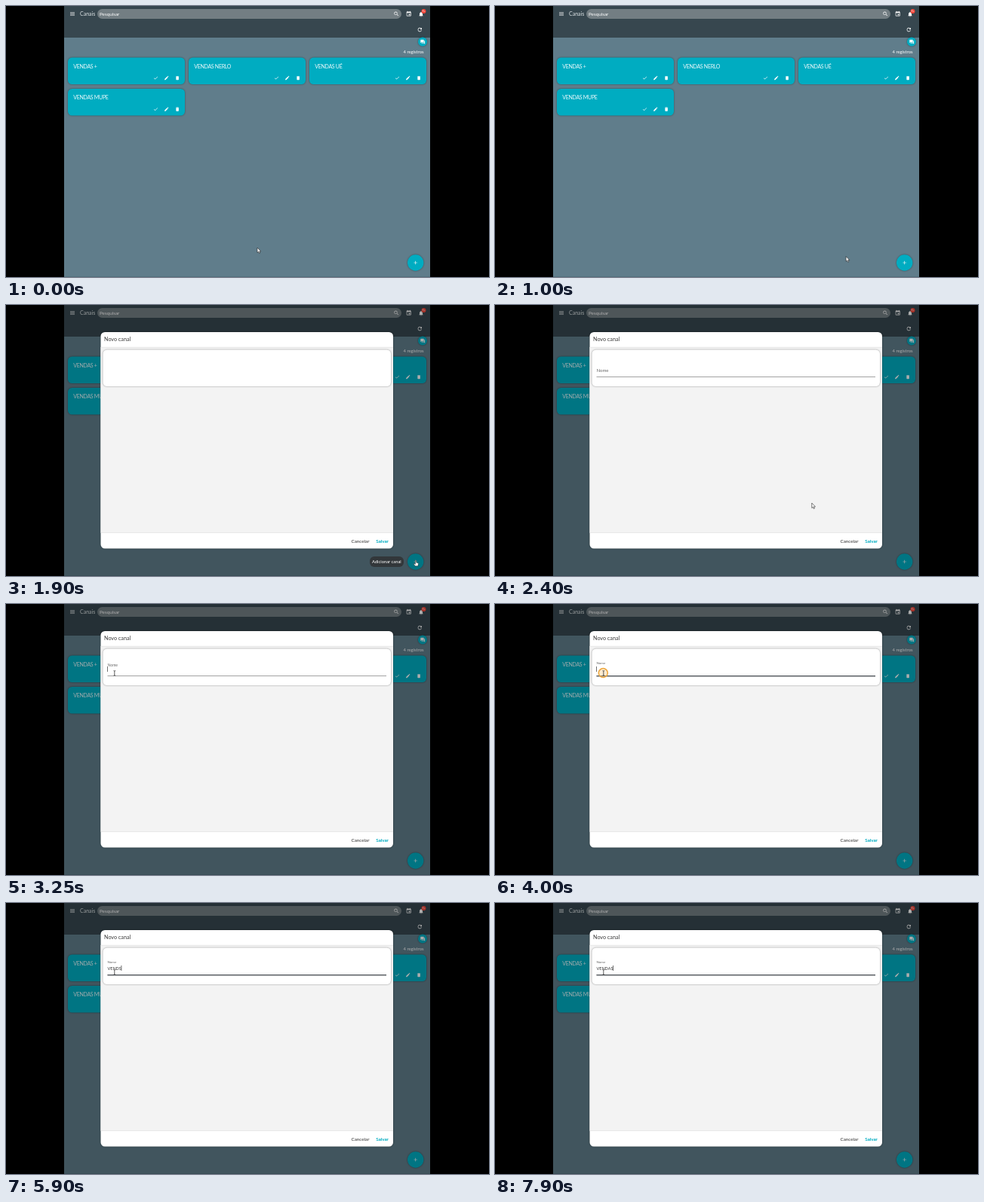
An HTML page for the animation above (8 s loop, 640 by 360 pixels).

```html
<!DOCTYPE html>
<html lang="pt-BR">
<head>
<meta charset="utf-8">
<title>Canais</title>
<style>
  html, body { margin: 0; width: 100%; height: 100%; overflow: hidden; background: #000; }
  svg { display: block; }
  text { font-family: Lato, "Open Sans", sans-serif; white-space: pre; }
  .shadow { filter: drop-shadow(0 .8px .9px rgba(0, 0, 0, .4)); }
</style>
</head>
<body>
<svg id="stage" width="640" height="360" viewBox="0 0 640 360" xmlns="http://www.w3.org/2000/svg">
  <g id="app">
    <rect x="77" width="485" height="360" fill="#607d8b"/>
    <rect x="77" width="485" height="42" fill="#37474f"/>
    <rect x="77" y="359" width="485" height="1" fill="#52707d"/>
    <rect x="121" y="4" width="403" height="13" rx="6.5" fill="#737e83"/>
  </g>
  <rect id="backdrop" x="77" width="485" height="360" opacity=".32"/>
  <g id="dialog">
    <rect class="shadow" x="125.5" y="36" width="387.5" height="287.5" rx="5.5" fill="#fff"/>
    <rect x="125.5" y="56" width="387.5" height="246.5" fill="#f3f3f3"/>
    <path d="M125.5 56.2h387.5M125.5 302.5h387.5" stroke="#dedede" stroke-width=".6"/>
    <rect class="shadow" x="128.5" y="59.5" width="381.5" height="48.5" rx="5.5" fill="#fff"/>
    <g id="field">
      <rect x="134.5" y="95" width="369.5" height=".8" fill="#8c8c8c"/>
      <rect id="focusLine" x="134.5" y="95" width="369.5" height="1.4" fill="#50555a"/>
      <rect id="caret" y="83" width=".7" height="7" fill="#333"/>
    </g>
  </g>
  <g id="tooltip">
    <rect x="482" y="334" width="45" height="14" rx="6" fill="#32373a"/>
  </g>
  <circle id="ring" cx="143.3" cy="91.6" r="6" fill="#f6c778" fill-opacity=".35" stroke="#eda63c" stroke-width="1.5"/>
  <g id="cursor">
    <path id="arrow" d="M0 0v6.6l1.5-1.3 1 2.3 1.2-.5-1-2.2h2z" fill="#fff" stroke="#222" stroke-width=".6"/>
    <path id="hand" d="M-.6 0q.6-.8 1.2 0v2.6l2.4.6q.6.3.4 1.3l-.6 2.8h-3.6l-2-2.8q.2-.9 1-.4l1.2.8z" fill="#fff" stroke="#222" stroke-width=".5"/>
    <path id="beam" d="M-1.3-3.2q1.3 0 1.3.8v5q0 .8-1.3.8M1.3-3.2Q0-3.2 0-2.4M1.3 3.4Q0 3.4 0 2.6" fill="none" stroke="#333" stroke-width=".8"/>
  </g>
</svg>
<script>
const LOOP = 8000;
const SVG = 'http://www.w3.org/2000/svg';
const CYAN = '#00acc1';
const $ = id => document.getElementById(id);

const icons = {
  check: 'M9 16.17L4.83 12l-1.42 1.41L9 19 21 7l-1.41-1.41z',
  edit: 'M3 17.25V21h3.75L17.81 9.94l-3.75-3.75zM20.71 7.04a1 1 0 000-1.41l-2.34-2.34a1 1 0 00-1.41 0l-1.83 1.83 3.75 3.75z',
  trash: 'M6 19a2 2 0 002 2h8a2 2 0 002-2V7H6zM19 4h-3.5l-1-1h-5l-1 1H5v2h14z',
  menu: 'M3 18h18v-2H3zM3 13h18v-2H3zM3 6v2h18V6z',
  search: 'M15.5 14h-.79l-.28-.27A6.47 6.47 0 0016 9.5 6.5 6.5 0 109.5 16c1.61 0 3.09-.59 4.23-1.57l.27.28v.79l5 4.99L20.49 19zm-6 0a4.5 4.5 0 110-9 4.5 4.5 0 010 9z',
  event: 'M17 12h-5v5h5zM16 1v2H8V1H6v2H5a2 2 0 00-2 2v14a2 2 0 002 2h14a2 2 0 002-2V5a2 2 0 00-2-2h-1V1zm3 18H5V8h14z',
  bell: 'M12 22a2 2 0 002-2h-4a2 2 0 002 2zM18 16v-5c0-3.07-1.64-5.64-4.5-6.32V4a1.5 1.5 0 00-3 0v.68C7.63 5.36 6 7.92 6 11v5l-2 2v1h16v-1z',
  refresh: 'M17.65 6.35A8 8 0 1019.73 14h-2.08A6 6 0 1112 6c1.66 0 3.14.69 4.22 1.78L13 11h7V4z',
  chat: 'M21 6h-2v9H6v2a1 1 0 001 1h11l4 4V7a1 1 0 00-1-1zM17 12V3a1 1 0 00-1-1H3a1 1 0 00-1 1v14l4-4h10a1 1 0 001-1z',
  add: 'M19 13h-6v6h-2v-6H5v-2h6V5h2v6h6z'
};

function add(parent, tag, attrs, content = '') {
  const node = document.createElementNS(SVG, tag);
  for (const key in attrs) node.setAttribute(key, attrs[key]);
  node.textContent = content;
  return parent.appendChild(node);
}

function label(parent, content, x, y, size, fill = '#fff', extra = {}) {
  return add(parent, 'text', { x, y, 'font-size': size, fill, ...extra }, content);
}

function icon(name, cx, cy, size = 7) {
  const scale = size / 24;
  add($('app'), 'path', {
    d: icons[name], fill: '#fff', 'fill-rule': 'evenodd',
    transform: `translate(${cx - size / 2} ${cy - size / 2}) scale(${scale})`
  });
}

function card(title, x, y) {
  add($('app'), 'rect', { x, y, width: 155, height: 35.5, rx: 5.5, fill: CYAN, class: 'shadow' });
  label($('app'), title, x + 7.3, y + 14.4, 7, '#eefafc', { 'letter-spacing': -.3 });
  ['check', 'edit', 'trash'].forEach((name, i) => icon(name, x + 116.5 + i * 14.3, y + 27));
}

function buildApp() {
  const app = $('app');
  icon('menu', 88, 10.5, 8);
  label(app, 'Canais', 98, 13, 7, '#dfe5e8');
  label(app, 'Pesquisar', 124, 12.6, 6.3);
  icon('search', 517.3, 10.5, 8);
  icon('event', 533.7, 10.5, 8);
  icon('bell', 550, 11, 8);
  add(app, 'circle', { cx: 553.5, cy: 7, r: 3, fill: '#f44336' });
  label(app, '9+', 553.5, 8.3, 3.6, '#fff', { 'text-anchor': 'middle' });
  icon('refresh', 548.3, 31.5, 8);
  add(app, 'circle', { cx: 552, cy: 47.5, r: 6, fill: CYAN, class: 'shadow' });
  icon('chat', 552.2, 47.7);
  label(app, '4 registros', 553.6, 63.2, 5.9, '#fff', { 'text-anchor': 'end' });
  card('VENDAS +', 82, 68.5);
  card('VENDAS NERLO', 242, 68.5);
  card('VENDAS UÉ', 402, 68.5);
  card('VENDAS MUPE', 82, 110);
  add(app, 'circle', { cx: 542.7, cy: 341, r: 10.7, fill: CYAN, class: 'shadow' });
  icon('add', 542.7, 341, 8);
}

buildApp();
label($('dialog'), 'Novo canal', 130, 48.4, 7.2, '#3c3c3c');
label($('dialog'), 'Cancelar', 457.5, 315.6, 6.3, '#333');
label($('dialog'), 'Salvar', 490.3, 315.6, 6.3, CYAN, { stroke: CYAN, 'stroke-width': .15 });
label($('tooltip'), 'Adicionar canal', 485, 343.1, 5.8);
const nameLabel = label($('field'), 'Nome', 134.5, 0, 6, '#666');
const typed = label($('field'), '', 134.5, 88.6, 5.5, '#333');

const clamp = v => Math.min(1, Math.max(0, v));
const progress = (t, from, to) => clamp((t - from) / (to - from));
const smooth = p => p * p * (3 - 2 * p);
const easeOut = p => 1 - (1 - p) ** 2.6;
const mix = (a, b, p) => a + (b - a) * p;
const within = (t, from, to) => t >= from && t < to;
const show = (id, visible) => $(id).setAttribute('visibility', visible ? 'inherit' : 'hidden');

const typing = [[0, ''], [4350, 'V'], [4600, 'VE'], [5150, 'VEN'], [5600, 'VEND'],
  [5900, 'VENDS'], [6400, 'VEND'], [6450, 'VENDA'], [6600, 'VENDAS']];
const caretOff = [[3650, 4000], [6650, 6850], [7400, 7900]];

function drawCursor(t) {
  const toButton = smooth(progress(t, 150, 1600));
  const toField = smooth(progress(t, 2050, 3000));
  const x = mix(mix(333, 543, toButton), 143.8, toField);
  const y = mix(mix(321, 339.5, toButton), 91.8, toField);
  const overButton = Math.hypot(x - 542.7, y - 341) < 10.7;
  const overField = x < 504 && y > 80 && y < 96 && t > 2000;
  $('cursor').setAttribute('transform', `translate(${x} ${y})`);
  show('hand', overButton);
  show('beam', overField);
  show('arrow', !overButton && !overField);
}

function drawField(t) {
  const float = easeOut(progress(t, 3150, 3500));
  nameLabel.setAttribute('font-size', mix(6, 4.4, float));
  nameLabel.setAttribute('y', mix(88.6, 79.5, float));
  $('focusLine').setAttribute('opacity', progress(t, 3250, 3400));
  typed.textContent = typing.findLast(([start]) => t >= start)[1];
  const width = typed.textContent ? typed.getComputedTextLength() : 0;
  $('caret').setAttribute('x', 134.3 + width);
  show('caret', t >= 3150 && !caretOff.some(([from, to]) => within(t, from, to)));
}

function draw(t) {
  const open = t >= 1900;
  show('backdrop', open);
  show('dialog', open);
  show('field', t >= 1950);
  const tip = progress(t, 1350, 1500) * (1 - progress(t, 2250, 2350));
  $('tooltip').setAttribute('opacity', tip);
  show('ring', within(t, 3150, 3250) || within(t, 4000, 4100));
  drawField(t);
  drawCursor(t);
}

const start = performance.now();
function tick() {
  draw((performance.now() - start) % LOOP);
  requestAnimationFrame(tick);
}
tick();
</script>
</body>
</html>
```
